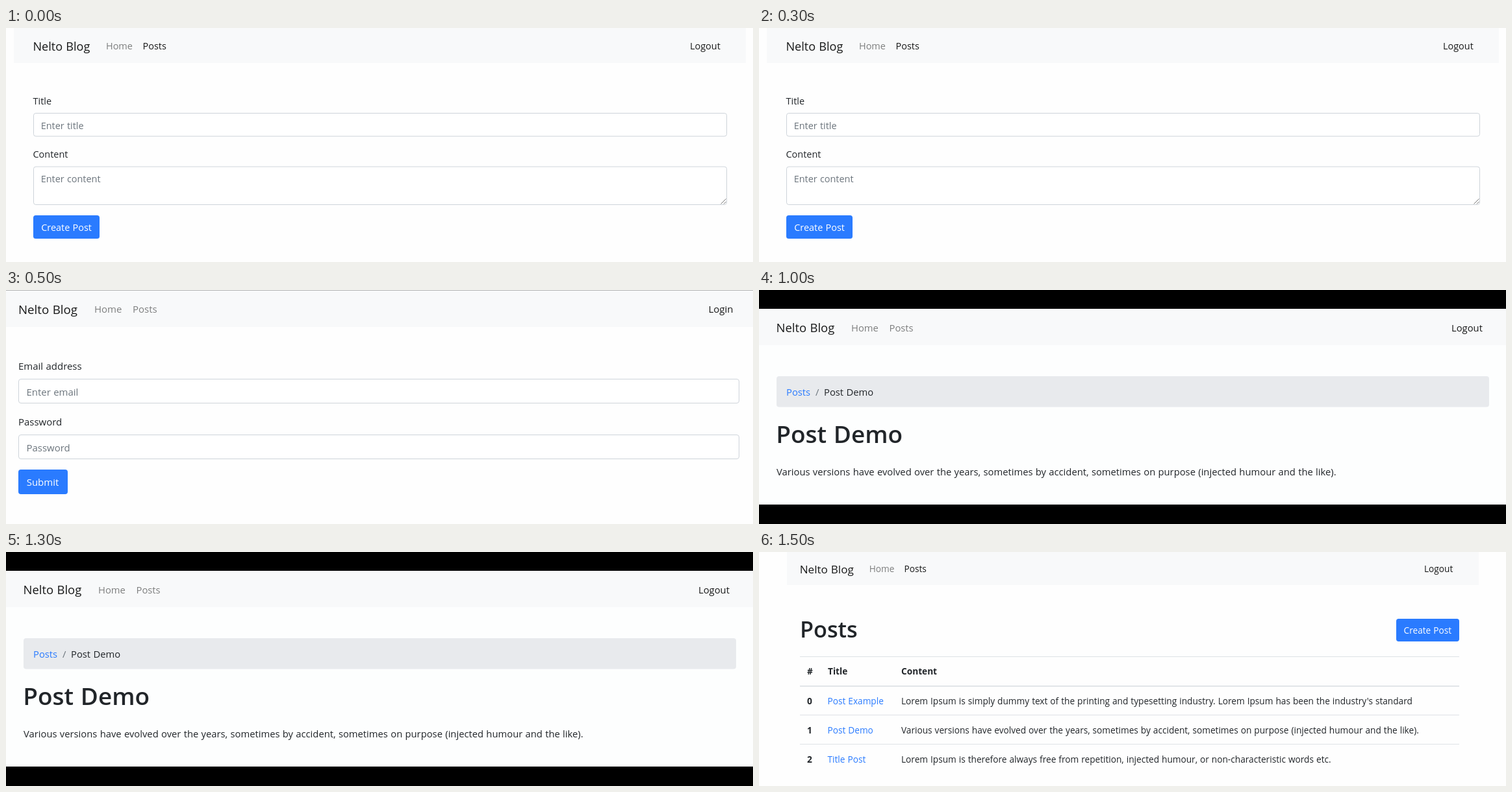
An HTML page that plays this animation: 1150x361 px, repeating every 2 s.

```html
<!DOCTYPE html>
<html lang="en">
<head>
<meta charset="utf-8">
<title>Blog screens</title>
<style>
  html, body { margin: 0; width: 100%; height: 100%; overflow: hidden; background: #fefefe; }
  svg { display: block; }
  text { font-family: "Open Sans", "Noto Sans", sans-serif; word-spacing: .033em; }
</style>
</head>
<body>
<svg id="stage" width="1150" height="361" viewBox="0 0 1150 361"></svg>
<script>
const NS = 'http://www.w3.org/2000/svg';
const stage = document.getElementById('stage');
const HOLD = 500;
const FIT = 0.935; // brings the x-height of a 16px line to 8px
const INK = '#212529', DARK = '#181919', DIM = '#7d7e7e', HINT = '#6c757d';
const BLUE = '#2a7bff', EDGE = '#ced4da', RULE = '#dee2e6', BAR = '#f8f9fa';
const BRAND = 'Nelto Blog';
const VARIOUS = 'Various versions have evolved over the years, sometimes by accident, ' +
  'sometimes on purpose (injected humour and the like).';

function add(parent, tag, attrs) {
  const el = document.createElementNS(NS, tag);
  for (const k in attrs) el.setAttribute(k, attrs[k]);
  parent.appendChild(el);
  return el;
}

// One screen at a given zoom, with helpers for its parts.
function screen(zoom) {
  const g = add(stage, 'g', { visibility: 'hidden' });
  const s = {
    g,
    box(x, y, width, height, fill, rx = 0) {
      add(g, 'rect', { x, y, width, height, fill, rx });
    },
    text(str, x, y, fill = INK, size = 16, weight = 400) {
      add(g, 'text', {
        x, y, fill, 'font-size': (size * zoom * FIT).toFixed(2), 'font-weight': weight
      }).textContent = str;
    },
    field(x, y, width, height) {
      add(g, 'rect', {
        x: x + .5, y: y + .5, width: width - 1, height: height - 1,
        rx: 3.5 * zoom, fill: '#fff', stroke: EDGE
      });
    },
    button(label, x, y, width, height) {
      s.box(x, y, width, height, BLUE, 4 * zoom);
      s.text(label, x + 12.7 * zoom, y + 25 * zoom, '#fff');
    },
    nav(x, y, width, height, left, home, posts, right, user, postsFill) {
      s.box(x, y, width, height, BAR);
      const base = y + height - 21.7 * zoom;
      s.text(BRAND, left, y + height - 20 * zoom, DARK, 20);
      s.text('Home', home, base, DIM);
      s.text('Posts', posts, base, postsFill);
      s.text(user, right, base, DARK);
    }
  };
  return s;
}

function createScreen() {
  const s = screen(.965);
  s.nav(12, 0, 1127, 54, 41.5, 154, 210.5, 1053, 'Logout', DARK);
  s.text('Title', 41.5, 117.6);
  s.field(42, 131, 1068, 36.5);
  s.text('Enter title', 53.7, 156, HINT);
  s.text('Content', 41.5, 200.4);
  s.field(42, 213.5, 1068, 59.5);
  s.text('Enter content', 53.7, 238, HINT);
  add(s.g, 'path', { d: 'M1100.5 271.5l8-8M1105 271.5l3.5-3.5', stroke: '#777', fill: 'none' });
  s.button('Create Post', 42, 289, 102, 36);
  return s.g;
}

function loginScreen() {
  const s = screen(1);
  s.nav(0, 1, 1150, 56, 19, 136, 195, 1081.5, 'Login', DIM);
  s.box(0, 0, 1150, 1, '#b4b4b4');
  s.text('Email address', 19, 123);
  s.field(19, 137, 1110, 38);
  s.text('Enter email', 31.5, 163, HINT);
  s.text('Password', 19, 209);
  s.field(19, 223, 1110, 38);
  s.text('Password', 31.5, 249, HINT);
  s.button('Submit', 19, 277, 76, 38);
  return s.g;
}

function postScreen() {
  const s = screen(.987);
  s.box(0, 0, 1150, 361, '#fdfefe');
  s.nav(0, 29, 1150, 56, 26.5, 142, 200.5, 1066, 'Logout', DIM);
  s.box(27, 133, 1097, 47.5, '#e8eaed', 4);
  s.text('Posts', 42, 163, BLUE);
  s.text('/', 87, 163, HINT);
  s.text('Post Demo', 100, 163);
  s.text('Post Demo', 26.3, 236, INK, 40, 600);
  s.text(VARIOUS, 27, 285.5);
  s.box(0, 0, 1150, 29, '#000');
  s.box(0, 331, 1150, 30, '#000');
  return s.g;
}

function listScreen() {
  const s = screen(.914);
  s.nav(43, 0, 1065, 51, 62.7, 169.7, 223.5, 1024, 'Logout', DARK);
  s.text('Posts', 63, 132, INK, 40, 600);
  s.button('Create Post', 981, 103, 97, 35);
  s.box(63, 161, 1015, 1, RULE);
  s.box(63, 206, 1015, 1.8, RULE);
  s.box(63, 251, 1015, 1, RULE);
  s.box(63, 296, 1015, 1, RULE);
  s.text('#', 74, 189, INK, 16, 700);
  s.text('Title', 106, 189, INK, 16, 700);
  s.text('Content', 219, 189, INK, 16, 700);
  const rows = [
    ['Post Example', 'Lorem Ipsum is simply dummy text of the printing and typesetting ' +
      "industry. Lorem Ipsum has been the industry's standard"],
    ['Post Demo', VARIOUS],
    ['Title Post', 'Lorem Ipsum is therefore always free from repetition, injected humour, ' +
      'or non-characteristic words etc.']
  ];
  rows.forEach(([title, body], i) => {
    const y = 235 + i * 44.8;
    s.text(i, 74, y, INK, 16, 700);
    s.text(title, 105.5, y, BLUE);
    s.text(body, 219, y);
  });
  return s.g;
}

const screens = [createScreen(), loginScreen(), postScreen(), listScreen()];

function draw(ms) {
  const now = Math.floor(ms / HOLD) % screens.length;
  screens.forEach((g, i) => g.setAttribute('visibility', i === now ? 'visible' : 'hidden'));
}

const start = performance.now();
function tick() {
  draw(performance.now() - start);
  requestAnimationFrame(tick);
}
tick();
</script>
</body>
</html>
```
